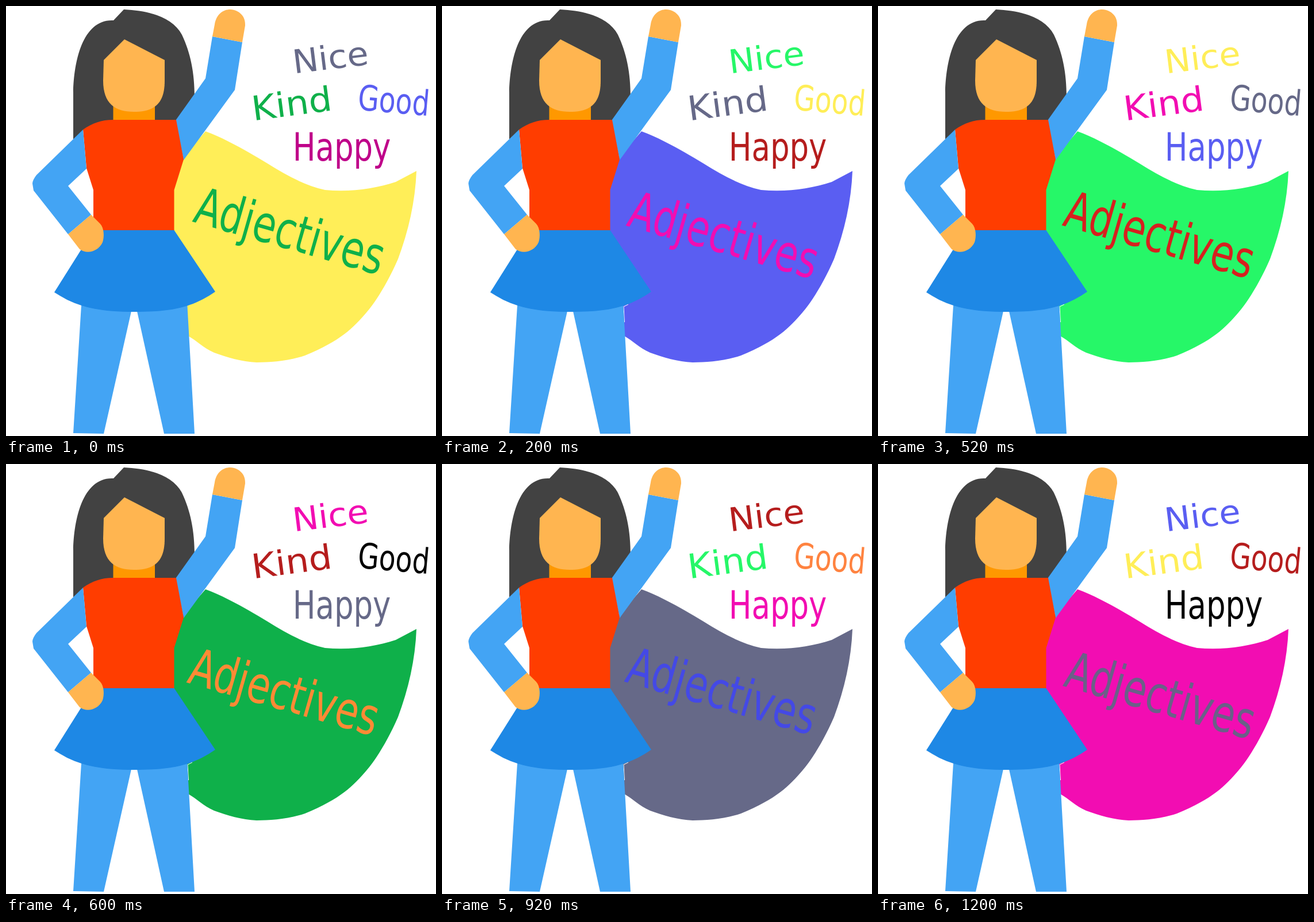
Write an HTML page that moves like this. It is 748 px wide and 748 px high and loops after 1400 ms.

```html
<!DOCTYPE html>
<html lang="en">
<head>
<meta charset="utf-8">
<title>Adjectives</title>
<style>
  html, body { margin: 0; width: 100%; height: 100%; overflow: hidden; background: #fff; }
  svg { display: block; width: 100%; height: 100%; }
  text { font-family: "DejaVu Sans", sans-serif; }
  .skin { fill: #ffb550; }
  .blue { fill: #43a4f4; }
</style>
</head>
<body>
<svg viewBox="0 0 748 748">
  <path id="cape" d="M347 218C385 232 425 256 455 274C490 296 520 312 555 320C600 324 640 318 678 306L714 287C712 340 700 392 682 440C665 479 645 512 628 532C604 560 583 582 520 608C490 618 460 620 436 620C410 619 385 611 362 603C342 594 333 583 317 574L312 500L288 392V310L309 262Z"/>
  <path id="gap" d="M324 519L316 523L317.500 550" fill="none" stroke="#fff"/>

  <path fill="#424242" d="M117 232V150C118 95 134 22 187 25L205 6C250 8 290 20 306 50C321 82 328 115 328 160V198H187L135 216Z"/>
  <path fill="#ff9800" d="M186.500 170H259V199H186.500Z"/>
  <path class="skin" d="M206 58L276 94V130C276 171 257 184 222 184C190 184 169 170 169 130L170 94Z"/>

  <path class="blue" d="M359 53L411 63L398 146L309 268L295 199L347 126Z"/>
  <path class="skin" d="M359 53L363 32C366 14 378 6 390 6C406 7 417 18 416 34L411 63Z"/>
  <path fill="#ff3d00" d="M134 215C150 204 165 198 187 198H296L309 267L292.500 320V391H152V320L140 282Z"/>
  <path class="blue" d="M132 505L117 743L170 744L220 522ZM226 522L275 744H328L314.500 505Z"/>
  <path fill="#1e88e5" d="M152 390H292.500L364 497C322 526 285 532 222 532C158 532 122 523 84 498Z"/>
  <path class="blue" d="M134 215L53 294Q46 303 46 309L48 321L108 397L148 363L108 313L140 283Z"/>
  <path class="skin" d="M108 397L148 363L164 379C171 387 171 402 168 411C160 428 140 432 128 423Z"/>

  <text id="nice" font-size="57" transform="translate(501 117.500) rotate(-7) scale(1.06 1)">Nice</text>
  <text id="kind" font-size="59" transform="translate(430 199.500) rotate(-7.500) scale(1.08 1)">Kind</text>
  <text id="good" font-size="61" transform="translate(610.800 180.300) rotate(5) scale(.775 1)">Good</text>
  <text id="happy" font-size="67" transform="translate(498.700 269) scale(.79 1)">Happy</text>
  <text id="title" font-size="89">Adjectives</text>
</svg>
<script>
const $ = id => document.getElementById(id);
const parts = ["cape", "nice", "kind", "good", "happy", "title"];
const STEP = 200;

const grey = "#666988", green = "#0fb04a", lime = "#26f768", blue = "#5a5ef2",
      yellow = "#ffee58", pink = "#f20db2", red = "#b51d1d", orange = "#ff8340", black = "#000";

// fills in the order of parts, then the title's offset
const scenes = [
  [yellow, grey, green, blue, "#bf0089", green, 0, 0],
  [blue, lime, grey, yellow, red, pink, -4, 7],
  [lime, yellow, pink, grey, blue, "#d7201f", -4, 6.5],
  [green, pink, red, black, grey, "#ff8a35", -10, 5],
  [grey, red, lime, orange, pink, "#4449e6", -7, 3.5],
  [red, "#060028", blue, pink, yellow, black, -4, 13],
  [pink, blue, yellow, red, black, "#6a6088", -2.5, 11]
];

function draw(now) {
  const i = Math.floor(now / STEP) % scenes.length;
  const scene = scenes[i];
  parts.forEach((id, k) => $(id).setAttribute("fill", scene[k]));
  const [dx, dy] = scene.slice(-2);
  $("title").setAttribute("transform", `translate(${323 + dx} ${374.8 + dy}) rotate(16) scale(.74 1)`);
  $("gap").setAttribute("opacity", i ? 1 : 0);
}

const start = performance.now();
function tick() {
  draw(performance.now() - start);
  requestAnimationFrame(tick);
}
tick();
</script>
</body>
</html>
```
